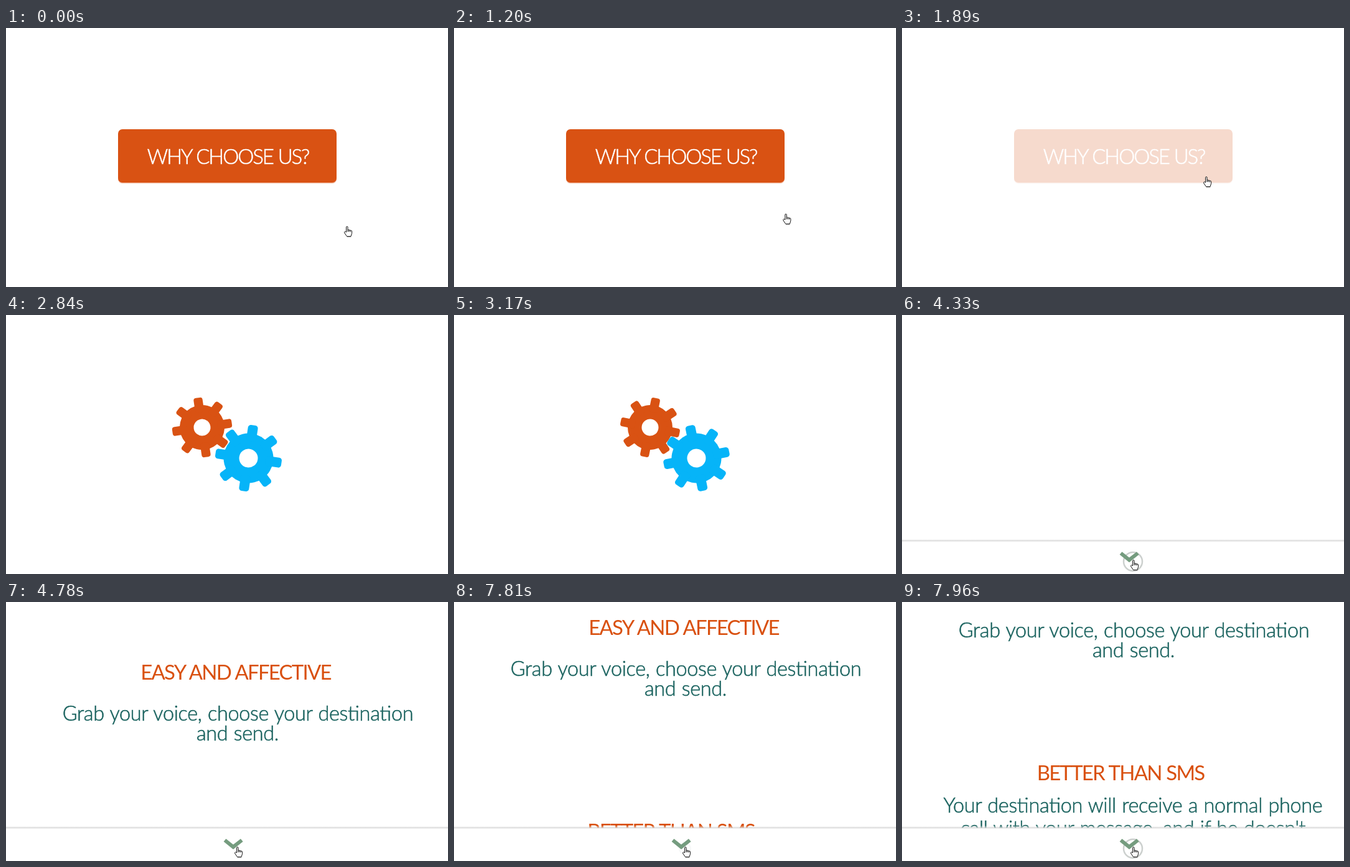
These frames come from a looping animation (710 px wide and 417 px high, 7.99 s). An HTML page:

```html
<!DOCTYPE html>
<html lang="en">
<head>
<meta charset="utf-8">
<title>Why choose us?</title>
<style>
  html, body { margin: 0; width: 100%; height: 100%; overflow: hidden; background: #fff; }
  svg { display: block; width: 100%; height: 100%; }
  text {
    font: 300 32.5px Lato, sans-serif; font-feature-settings: "liga" 1;
    letter-spacing: -.36px; word-spacing: 1px; text-anchor: middle;
    fill: #1c6460; stroke: #1c6460; stroke-width: .6px;
  }
  .title { font-weight: 400; font-size: 33px; letter-spacing: -1.8px; fill: #d9500f; stroke: none; }
  .label { font-size: 33px; letter-spacing: -2.1px; fill: #fff; stroke: #fff; }
</style>
</head>
<body>
<svg viewBox="0 0 710 417">
  <defs>
    <linearGradient id="shade" x2="0" y2="1">
      <stop offset="0" stop-color="#fff" stop-opacity="0"/>
      <stop offset="1" stop-color="#c8c8c8"/>
    </linearGradient>
    <g id="gear">
      <circle r="40"/>
      <g id="teeth"></g>
      <circle r="15" fill="#fff"/>
    </g>
  </defs>

  <g id="button">
    <rect x="180" y="165" width="351" height="85.5" rx="7" fill="#d95213" opacity=".3"/>
    <rect x="180" y="163" width="351" height="86" rx="7" fill="#d95213"/>
    <text class="label" x="356.5" y="218.5">WHY CHOOSE US?</text>
  </g>

  <use id="orange" href="#gear" fill="#d95213"/>
  <use id="blue" href="#gear" fill="#06b4f8"/>

  <g id="first">
    <text class="title" x="369" y="124.5">EASY AND AFFECTIVE</text>
    <text x="372.5" y="190.5">Grab your voice, choose your destination</text>
    <text x="372" y="222.5">and send.</text>
  </g>
  <g id="second">
    <text class="title" x="351" y="286.5">BETTER THAN SMS</text>
    <text x="371" y="338.5">Your destination will receive a normal phone</text>
    <text x="371" y="375.5">call with your message, and if he doesn't</text>
  </g>

  <g id="bar">
    <rect y="364" width="710" height="53" fill="#fff"/>
    <rect y="360" width="710" height="4.3" fill="url(#shade)"/>
    <circle id="ring" cx="371" cy="397" fill="none" stroke="#ccd0ce" stroke-width="2.5"/>
    <path d="M351.5 383.5L365 394.3L378.8 383.5" fill="none" stroke="#759c7f" stroke-width="6"/>
  </g>

  <g id="hand">
    <path d="M4.5 17.8H11.5" stroke="#bbb"/>
    <path d="M3.6 10V1.8Q3.6 .5 4.8 .5T6 1.8V6Q7.3 5 8 6.4Q9.6 5.6 10.2 7Q12.2 6.4 12.6 8.2V11.5L11 16.5H4.6L.8 11Q.2 9 1.4 8.6Q2.6 8.6 3.6 10ZM6 6V9M8 6.4V9M10.2 7V9.4"
      fill="#fff" stroke="#111" stroke-linejoin="round"/>
  </g>
</svg>
<script>
const LOOP = 7990, TICK = 30;
const el = id => document.getElementById(id);
const clamp = v => Math.min(1, Math.max(0, v));
const ramp = (t, from, to) => clamp((t - from) / (to - from));
const mix = (a, b, k) => a + (b - a) * k;
const alpha = (id, v) => el(id).setAttribute('opacity', v);
const place = (id, x, y, more = '') => el(id).setAttribute('transform', `translate(${x} ${y}) ${more}`);

el('teeth').innerHTML = Array.from({ length: 8 }, (_, i) =>
  `<rect x="-8" y="-53.5" width="16" height="26" rx="4.5" transform="rotate(${i * 45})"/>`).join('');

function drawHand(t) {
  if (t < 3410) {
    const k = clamp(Math.floor((t - 1100) / 100) / 4);
    place('hand', mix(543, 484, k), mix(319, 239, k));
  } else {
    const k = ramp(t, 3880, 4210);
    place('hand', mix(527, 367, k), mix(300, 394, k));
  }
  alpha('hand', t < 1990 || t >= 3410 ? 1 : 0);
}

function drawGears(t) {
  const turn = (Math.min(3410, Math.max(2650, t)) - 3170) * .06;
  const out = 1 - ramp(t, 3290, 3410);
  place('orange', 315, 181, `rotate(${12 + turn}) scale(.9)`);
  place('blue', 389.5, 230.5, `rotate(${-12 - turn})`);
  alpha('orange', ramp(t, 1990, 2110) * out);
  alpha('blue', ramp(t, 2620, 2740) * out);
}

function drawPage(t) {
  const next = t >= 7810, k = ramp(t, 7810, 7960);
  place('first', 0, next ? mix(-72, -134, k) : Math.max(0, (4780 - t) * .8));
  place('second', mix(-2.5, 0, k), mix(94, 0, k));
  alpha('first', t >= 3910 ? 1 : 0);
  alpha('second', next ? 1 : 0);
  alpha('bar', ramp(t, 3290, 3400));

  const grow = next ? k : ramp(t, 4180, 4330);
  el('ring').setAttribute('r', mix(9, 15, grow));
  const fade = 1 - ramp(t, 4360, 4480);
  alpha('ring', next ? mix(.15, 1, k) : t >= 4180 ? mix(.15, 1, grow) * fade : 0);
}

function draw(now) {
  const time = now % LOOP;
  const t = Math.floor((time - 10) / TICK) * TICK + 10;
  alpha('button', time < 1990 ? Math.max(.2, 1 - ramp(t, 1680, 1920)) : 0);
  drawHand(time < 1990 ? time : t);
  drawGears(t);
  drawPage(t);
}

const start = performance.now();
function loop() {
  draw(performance.now() - start);
  requestAnimationFrame(loop);
}
loop();
</script>
</body>
</html>
```
